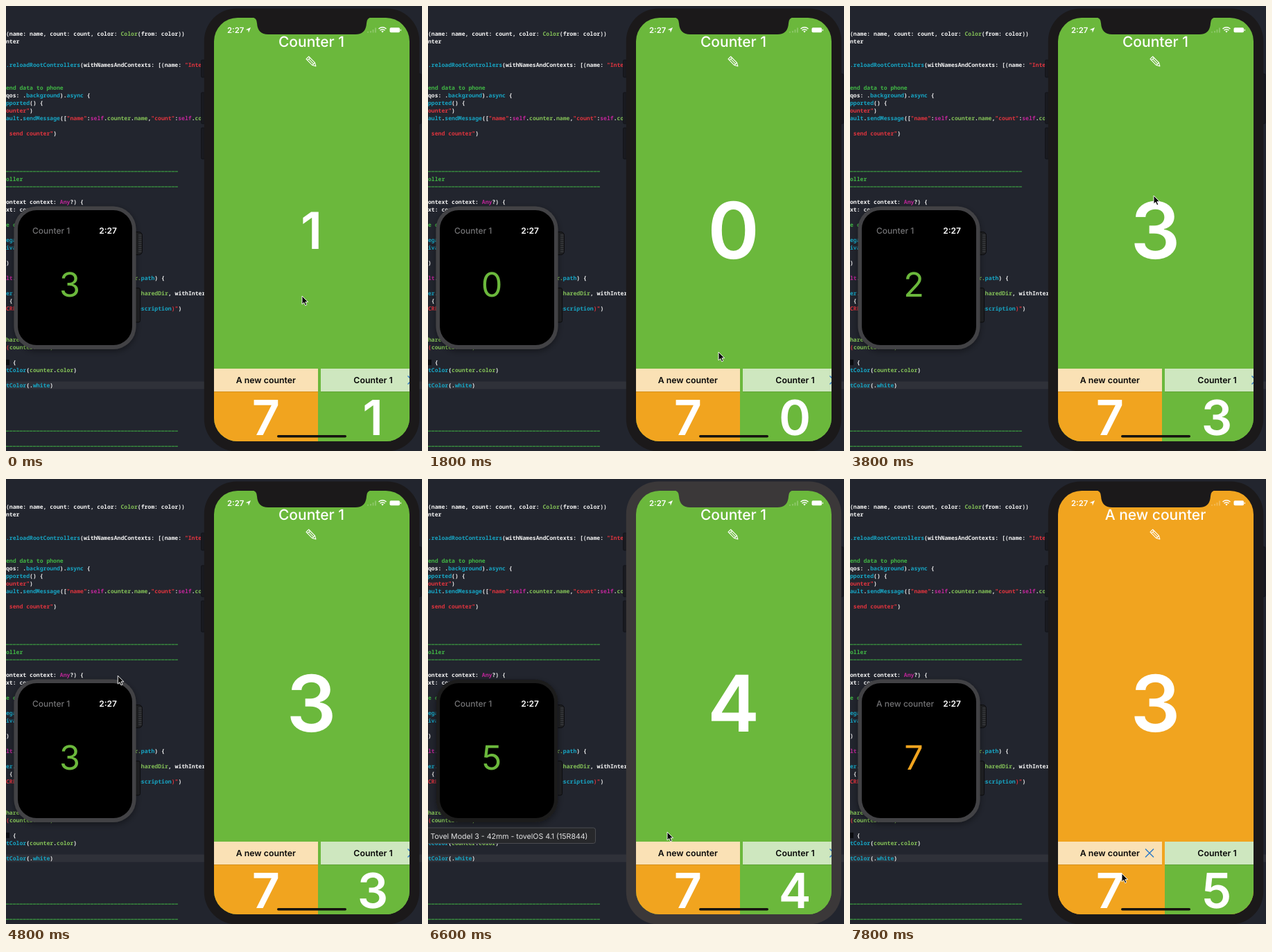
Write an HTML page that moves like this. It is 600 px wide and 643 px high and loops after 8000 ms.

```html
<!DOCTYPE html>
<html lang="en">
<head>
<meta charset="utf-8">
<title>Counter sync</title>
<style>
  html, body { margin: 0; width: 100%; height: 100%; overflow: hidden; background: #22252e; }
  svg { display: block; width: 100vw; height: 100vh; }
  text { font-family: Inter, Roboto, sans-serif; white-space: pre; text-rendering: geometricPrecision; }
  #code text { font: 600 8.12px "Noto Sans Mono", "DejaVu Sans Mono", monospace; }
  .mid { text-anchor: middle; }
  .white { fill: #fff; }
</style>
</head>
<body>
<svg viewBox="0 0 600 643" preserveAspectRatio="none">
  <defs>
    <clipPath id="screen"><rect x="300" y="17" width="282" height="612" rx="34"/></clipPath>
    <filter id="shade" x="-20%" y="-20%" width="140%" height="140%">
      <feDropShadow dx="0" dy="3" stdDeviation="5" flood-color="#000" flood-opacity=".4"/>
    </filter>
    <path id="cross" d="M-6 -6L6 6M6 -6L-6 6" fill="none" stroke="#2a78c8" stroke-width="1.4"/>
  </defs>

  <rect width="600" height="643" fill="#22252e"/>
  <rect y="542.5" width="600" height="11" fill="#2f3139"/>
  <g id="code"></g>

  <g id="phone">
    <g fill="#191a20" stroke="#101116" stroke-width=".8">
      <rect x="281.500" y="78" width="8" height="25" rx="1.500"/>
      <rect x="281.500" y="125" width="8" height="45" rx="1.500"/>
      <rect x="281.500" y="176" width="8" height="45" rx="1.500"/>
      <rect x="594" y="98" width="5" height="72" rx="1.500"/>
    </g>
    <rect id="bezel" x="285.800" y="3.500" width="310.400" height="640" rx="47"/>
    <g clip-path="url(#screen)">
      <rect id="page" x="300" y="17" width="282" height="612"/>
      <text id="title" class="mid white" x="440.500" y="59" font-size="21" font-weight="500"/>
      <g transform="translate(440.500 80.500) rotate(45)" fill="none" stroke="#fff" stroke-width="1.100" stroke-linejoin="round">
        <path d="M-8 -2.600H4.500L9 0L4.500 2.600H-8ZM-5.500 -2.600V2.600M4.500 -2.600V2.600M-5 0H4"/>
      </g>
      <text id="big" class="mid white" font-size="113" font-weight="600" y="41"/>
      <rect x="300" y="524" width="150" height="105" fill="#f1a41f"/>
      <rect x="454" y="524" width="150" height="105" fill="#6bb83c"/>
      <path d="M300 524H450V557H300ZM454 524H604V557H454Z" fill="#fff" fill-opacity=".67"/>
      <path d="M300 557.500H450M454 557.500H604" stroke="#000" stroke-opacity=".12"/>
      <g class="mid" font-size="12.300" font-weight="600" fill="#080808">
        <text x="374.800" y="545">A new counter</text>
        <text x="529.500" y="545">Counter 1</text>
      </g>
      <use id="pick" href="#cross" y="540.500"/>
      <g class="mid white" font-size="70" font-weight="600">
        <text x="375" y="619.500">7</text>
        <text id="cell" x="529" y="619.500"/>
      </g>
    </g>
    <path id="notch" d="M354 16Q362 17 362 25Q363 41 378 41H504Q519 41 520 25Q520 17 528 16Z"/>
    <g class="white">
      <text x="319" y="38.500" font-size="11.300" font-weight="600">2:27</text>
      <path d="M353 31L349.800 38.500L349.300 34.700L345.500 34.200Z"/>
      <path d="M521 37h2v1.500h-2zM525 36h2v2.500h-2zM528.500 34h2v4.500h-2zM532 31.500h2v7h-2z" opacity=".22"/>
      <path d="M541.300 36.500L543 38.500L544.700 36.500Q543 35.200 541.300 36.500Z"/>
      <path d="M537.500 33Q543 28.700 548.500 33M539.500 35.200Q543 32.300 546.500 35.200" fill="none" stroke="#fff" stroke-width="1.500"/>
      <rect x="553.500" y="31.300" width="14.500" height="7" rx="1.700"/>
      <rect x="568.700" y="33.500" width="1.200" height="2.600" rx=".6"/>
    </g>
    <rect x="391" y="620" width="100" height="3.500" rx="1.750" fill="#15130f"/>
  </g>

  <g id="watch">
    <g fill="#202124" stroke="#0c0c0e">
      <rect x="180" y="326.500" width="16.500" height="33" rx="5"/>
      <rect x="182" y="407.500" width="11.500" height="49.500" rx="2.500"/>
    </g>
    <path d="M191 331H195.500M191 334H195.500M191 337H195.500M191 340H195.500M191 343H195.500M191 346H195.500M191 349H195.500M191 352H195.500M191 355H195.500" stroke="#55565a" stroke-width=".8"/>
    <rect id="rim" x="11.500" y="289.500" width="176" height="206.500" rx="33" filter="url(#shade)"/>
    <rect x="17" y="295" width="165" height="195" rx="27"/>
    <text id="name" x="38" y="329" font-size="12" font-weight="500" fill="#737375"/>
    <text class="white" x="160" y="329" font-size="12" font-weight="600" text-anchor="end">2:27</text>
    <text id="wrist" class="mid" x="92" y="420" font-size="48.500"/>
  </g>

  <g id="tip">
    <rect x="-6" y="504" width="247.500" height="22.500" rx="3" fill="#27282b" stroke="#505155" stroke-width=".9"/>
    <text x="230.500" y="520" font-size="10.600" text-anchor="end" fill="#e4e4e5">Tovel Model 3 - 42mm - tovelOS 4.1 (15R844)</text>
  </g>
  <path id="arrow" d="M0 0V12L2.800 9.500L4.700 13.800L6.800 12.900L4.900 8.700H8.700Z" fill="#080808" stroke="#fff" stroke-width=".9" stroke-linejoin="round"/>
</svg>
<script>
const $ = id => document.getElementById(id);
const GREEN = '#6bb83c', ORANGE = '#f1a41f';
const LOOP = 8000, STEP = 200;

// Code lines: [row, column, segments]; the first letter of a segment picks its colour.
const ink = { w: '#f4f4f4', g: '#41b645', p: '#83c057', c: '#17a5c4', m: '#c0269a', r: '#e0343e' };
const lines = [
  [0, 0, 'w(name: name, count: count, color: ~pColor~w(from: color))'],
  [1, 0, 'wnter'],
  [4, 0, 'c.reloadRootControllers~w(withNamesAndContexts: [(name: ~r"Inte'],
  [7, 0, 'gend data to phone'],
  [8, 0, 'wqos: .~cbackground~w).~casync~w {'],
  [9, 0, 'cpported~w() {'],
  [10, 0, 'rounter"~w)'],
  [11, 0, 'cault~w.~csendMessage~w([~r"name"~w:~mself~w.~pcounter~w.~pname~w,~r"count"~w:~mself~w.~pco'],
  [13, 0, 'r send counter"~w)'],
  [19, 0, 'goller'],
  [22, 0, 'wontext context: ~mAny~w?) {'],
  [23, 0, 'wxt: context)'],
  [25, 0, 'ge co'],
  [27, 0, 'cegar'],
  [28, 0, 'civat'],
  [30, 0, 'w)'],
  [32, 0, 'mlt~w.'],
  [32, 38, 'pr.~cpath~w) {'],
  [34, 0, 'cer~w.'],
  [34, 39, 'psharedDir~w, withInter'],
  [35, 1, 'w{'],
  [36, 0, 'rCRE'],
  [36, 39, 'cescription~r)"~w)'],
  [40, 0, 'phare'],
  [41, 0, 'r(~pcounter.name)'],
  [43, 2, 'w{'],
  [44, 0, 'ctColor~w(~pcounter~w.~pcolor~w)'],
  [46, 0, 'ctColor~w(.~cwhite~w)']
];
const rowY = row => 40.6 + row * 11.03;
const span = s => `<tspan fill="${ink[s[0]]}">${s.slice(1)}</tspan>`;
$('code').innerHTML =
  lines.map(([row, col, s]) => `<text x="${col * 4.872}" y="${rowY(row) + 2.8}">${s.split('~').map(span).join('')}</text>`).join('') +
  [18, 20, 52, 54].map(row => `<path d="M0 ${rowY(row)}H248" stroke="${ink.g}" stroke-dasharray="4.4 .47"/>`).join('') +
  `<rect y="${rowY(43) - 4}" width="5" height="8" fill="#0b0c10"/>`;

// Tracks of [time, value...]
const phoneTrack = [[0, 1], [800, 0], [2400, 1], [2800, 2], [3400, 3], [6200, 4], [7000, 5], [7400, 1], [7600, 2], [7800, 3]];
const watchTrack = [[0, 3], [400, 2], [800, 1], [1400, 0], [2800, 1], [3400, 2], [4200, 3], [5600, 4], [6000, 5], [7600, 7]];
const pointer = [
  [0, 427, 419], [400, 424, 500], [600, 428, 340], [1000, 420, 500], [1800, 419, 500],
  [2200, 426, 470], [2400, 432, 300], [2600, 426, 450], [2800, 434, 290], [3000, 428, 450],
  [3400, 438, 274], [4200, 438, 274], [5000, 110, 286], [5200, 93, 297], [5600, 92, 390],
  [6000, 95, 400], [6600, 345, 510], [7000, 372, 575], [7200, 372, 575], [7800, 392, 570], [8000, 392, 570]
];
const swipes = [0, 800, 2400, 2800, 3400];

const held = (track, t) => track.filter(k => k[0] <= t).pop()[1];

function along(track, t) {
  const i = track.findIndex(k => k[0] > t);
  const [t0, x0, y0] = track[i - 1], [t1, x1, y1] = track[i];
  let f = (t - t0) / (t1 - t0);
  f = f * f * (3 - 2 * f);
  return [x0 + (x1 - x0) * f, y0 + (y1 - y0) * f];
}

function zoom(t) {
  const age = t - swipes.filter(s => s <= t).pop();
  return 1 - .35 * Math.max(0, 1 - age / 400) ** 2;
}

function draw(ms) {
  const t = Math.floor(ms % LOOP / STEP) * STEP;
  const onWatch = t >= 5000 && t < 7000;
  const second = t >= 7400, synced = t >= 7600;
  const n = held(phoneTrack, t);
  const label = on => on ? 'A new counter' : 'Counter 1';
  const tint = on => on ? ORANGE : GREEN;

  $('bezel').setAttribute('fill', onWatch ? '#3b3839' : '#1b191a');
  $('notch').setAttribute('fill', onWatch ? '#3b3839' : '#1b191a');
  $('rim').setAttribute('fill', onWatch ? '#1d1d1f' : '#434345');
  $('tip').style.display = onWatch ? '' : 'none';

  $('page').setAttribute('fill', tint(second));
  $('title').textContent = label(second);
  $('big').textContent = n;
  $('big').setAttribute('transform', `translate(440.5 324) scale(${zoom(t)})`);
  $('cell').textContent = second ? 5 : n;
  $('pick').setAttribute('x', second ? 432 : 585.5);

  $('name').textContent = label(synced);
  $('wrist').textContent = held(watchTrack, t);
  $('wrist').setAttribute('fill', tint(synced));
  $('arrow').setAttribute('transform', `translate(${along(pointer, t)})`);
}

const start = performance.now();
function tick() {
  draw(performance.now() - start);
  requestAnimationFrame(tick);
}
tick();
</script>
</body>
</html>
```
